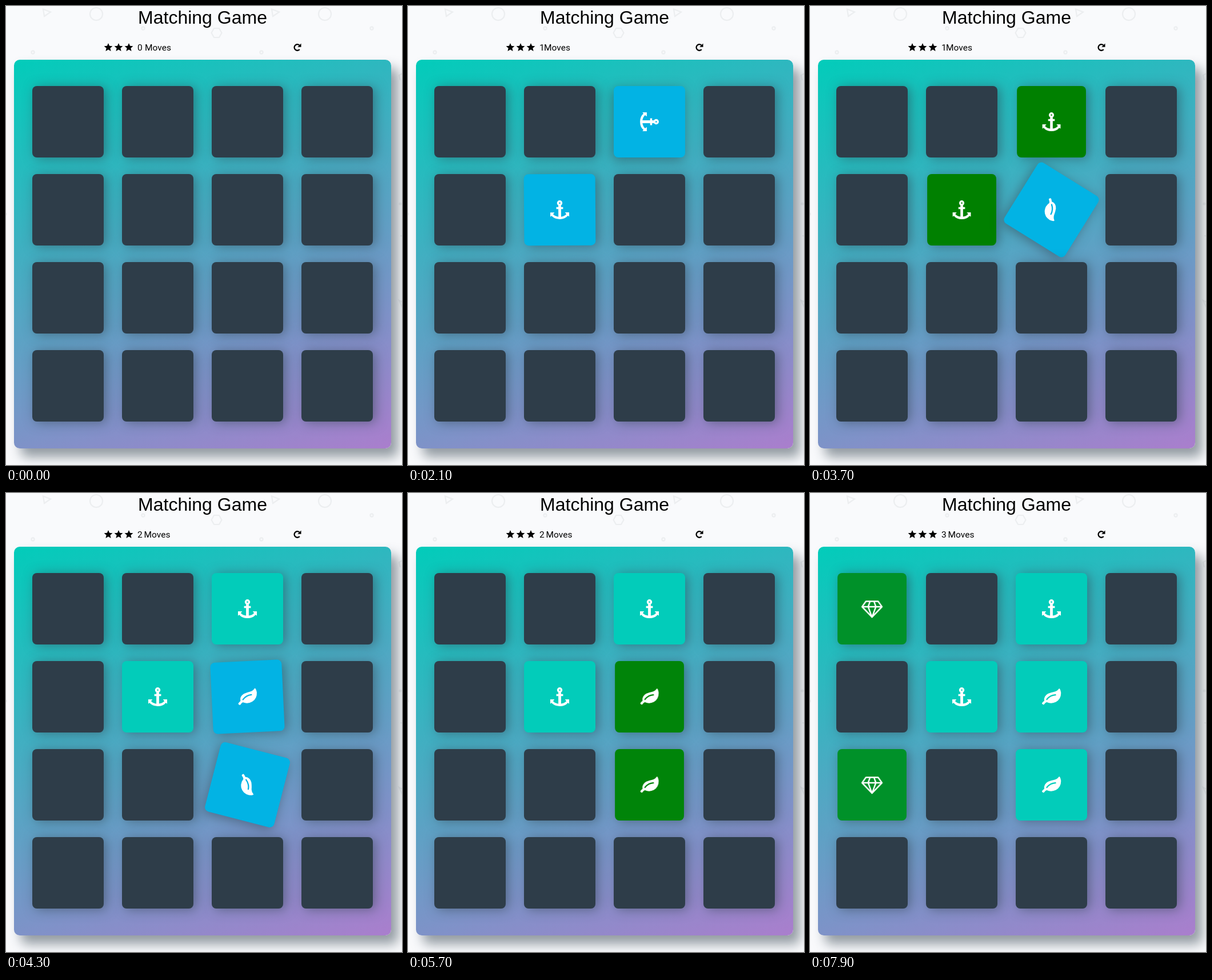
Write an HTML page that moves like this. It is 693 px wide and 803 px high and loops after 8 s.

```html
<!DOCTYPE html>
<html lang="en">
<head>
<meta charset="utf-8">
<title>Matching Game</title>
<style>
  html, body { margin: 0; width: 100%; height: 100%; overflow: hidden; background: #f9fafc; }
  #page { position: absolute; left: 0; top: 0; }
  .pattern { fill: none; stroke: #eceef0; stroke-width: 2.2; }
  .pattern .dot { fill: #eceef0; stroke: none; }
  .title { font: 32px "Liberation Sans", Arial, sans-serif; }
  .moves { font: 15.5px Roboto, sans-serif; }
  #deck {
    position: absolute; left: 14px; top: 94px; width: 660px; height: 680px; border-radius: 10px;
    background: linear-gradient(160deg, #02ccba 0%, #aa7ecd 100%);
    box-shadow: 12px 15px 20px 0 rgba(46, 61, 73, .5);
  }
  .card {
    position: absolute; width: 125px; height: 125px; border-radius: 8px; background: var(--face);
    box-shadow: 5px 2px 20px 0 rgba(46, 61, 73, .5);
  }
  .card svg { display: block; fill: #fff; }
  .vein { fill: none; stroke: var(--face); stroke-width: 2.3; stroke-linecap: round; }
  .outline { fill: none; stroke: #fff; stroke-width: 2.5; stroke-linejoin: round; }
</style>
</head>
<body>
<svg id="page" width="693" height="803">
  <defs>
    <g id="tile">
      <path d="M65 5.5L78 10.5L67 18Z"/>
      <circle cx="158" cy="14" r="11"/>
      <path d="M359.500 47L364 39H373L377.500 47L373 55H364Z"/>
      <circle class="dot" cx="47" cy="81" r="2.600"/>
      <circle class="dot" cx="240" cy="39" r="2.600"/>
    </g>
  </defs>
  <g class="pattern">
    <use href="#tile"/>
    <use href="#tile" x="400"/>
    <path d="M696 117L688 121L690 130M696 403L690 402M697 535L688 515L697 520"/>
    <circle class="dot" cx="690" cy="346" r="2.600"/>
    <circle class="dot" cx="-1" cy="364" r="2.600"/>
  </g>
  <text class="title" x="344" y="31" text-anchor="middle">Matching Game</text>
  <g id="stars"></g>
  <text class="moves" id="count" x="230" y="78"></text>
  <text class="moves" id="label" y="78">Moves</text>
  <path d="M513.400 68.500A5.300 5.300 0 1 0 513.800 76" fill="none" stroke="#000" stroke-width="2.300"/>
  <path d="M516.500 65.500V71.800H510.200Z"/>
</svg>
<div id="deck"></div>

<script>
const LOOP = 8000, STEP = 100;
const SPIN = 900, MATCH_DELAY = 920, MATCH = 900;
const CLOSED = '#2e3d49', OPEN = '#02b3e4';
const TEAL = [2, 204, 186], GREEN = [0, 128, 0];

const icons = {
  anchor: `<circle cy="-11.800" r="3" fill="none" stroke="#fff" stroke-width="3.400"/>
    <path d="M-2.400-8H2.400V14H-2.400Z M-5.900-4.700H5.900V-1.200H-5.900Z"/>
    <path d="M-16.500 4.600H-9.200L-11.600 7.600Q-8 12 0 12.400Q8 12 11.600 7.600L9.200 4.600H16.500V12.200
      L14.300 10.400Q9.500 16.400 0 16.400Q-9.500 16.400-14.300 10.400L-16.500 12.200Z"/>`,
  leaf: `<path d="M13.500-14.500Q15.500-14.500 16.800-7Q16.800 4 8 9Q0 13-8 9.500Q-10 9.500-13 13.500
      Q-14.500 14.500-16.500 12Q-17 10.500-12.500 7Q-14-1-6-5.500Q0-8 6-9Q10-10 13.500-14.500Z"/>
    <path class="vein" d="M-8 4.500Q-2-2.800 7-3.300"/>`,
  diamond: `<path class="outline" d="M-11-13H11L18-3.500L0 14.700L-18-3.500Z
      M-18-3.500H18M-3.500-13L-7-3.500L0 14.700L7-3.500L3.500-13"/>`
};

// Each pair: icon, then [column, row, click time] for both cards.
const pairs = [
  ['anchor', [1, 1, 1240], [2, 0, 1938]],
  ['leaf', [2, 1, 3503], [2, 2, 4122]],
  ['diamond', [0, 2, 5830], [0, 0, 6552]]
];

const byId = id => document.getElementById(id);
const clamp = x => Math.min(1, Math.max(0, x));

// CSS "ease": cubic-bezier(.25, .1, .25, 1)
function ease(x) {
  const curve = (s, a, b) => 3 * s * (1 - s) ** 2 * a + 3 * s * s * (1 - s) * b + s ** 3;
  let low = 0, high = 1;
  for (let i = 0; i < 24; i++) {
    const mid = (low + high) / 2;
    if (curve(mid, .25, .25) < x) low = mid; else high = mid;
  }
  return curve(low, .1, 1);
}

function mix(a, b, k) {
  return `rgb(${a.map((v, i) => Math.round(v + (b[i] - v) * k))})`;
}

function starPath(cx, cy, r) {
  const points = Array.from({ length: 10 }, (_, i) => {
    const radius = i % 2 ? r * .45 : r, angle = (i / 5 - .5) * Math.PI;
    return `${cx + radius * Math.cos(angle)} ${cy + radius * Math.sin(angle)}`;
  });
  return `<path d="M${points.join('L')}Z"/>`;
}

function addCard(column, row) {
  const el = document.createElement('div');
  el.className = 'card';
  el.style.left = 32 + 157 * column + 'px';
  el.style.top = 46 + 154 * row + 'px';
  byId('deck').append(el);
  return el;
}

byId('stars').innerHTML = [179, 197, 215].map(x => starPath(x, 72.7, 7.8)).join('');

const cells = Array.from({ length: 16 }, (_, i) => addCard(i % 4, i >> 2));
cells.forEach(el => el.style.setProperty('--face', CLOSED));

const cards = pairs.flatMap(([icon, first, second]) =>
  [first, second].map(([column, row, click]) => {
    const el = cells[row * 4 + column];
    el.innerHTML = `<svg width="125" height="125" viewBox="-62.5 -62.5 125 125">${icons[icon]}</svg>`;
    return { el, click, matchAt: second[2] + MATCH_DELAY };
  }));

function drawCard({ el, click, matchAt }, t) {
  const open = t >= click, match = (t - matchAt) / MATCH;
  let face = open ? OPEN : CLOSED, transform = 'none';
  if (match >= 1) {
    face = mix(TEAL, GREEN, 0);
  } else if (match >= 0) {
    face = mix(TEAL, GREEN, ease(match));
    transform = 'rotateY(15deg)';
  } else if (open && t < click + SPIN) {
    transform = `rotate(${360 * ease(clamp((t - click) / SPIN))}deg)`;
  }
  el.style.setProperty('--face', face);
  el.style.transform = transform;
  el.firstChild.style.visibility = open ? 'visible' : 'hidden';
}

function draw(now) {
  const t = Math.floor(now % LOOP / STEP) * STEP;
  cards.forEach(card => drawCard(card, t));
  const moves = pairs.filter(pair => t >= pair[2][2]).length;
  byId('count').textContent = moves;
  byId('label').setAttribute('x', [243, 238, 241.5, 241.5][moves]);
}

const start = performance.now();
function tick() {
  draw(performance.now() - start);
  requestAnimationFrame(tick);
}
tick();
</script>
</body>
</html>
```
